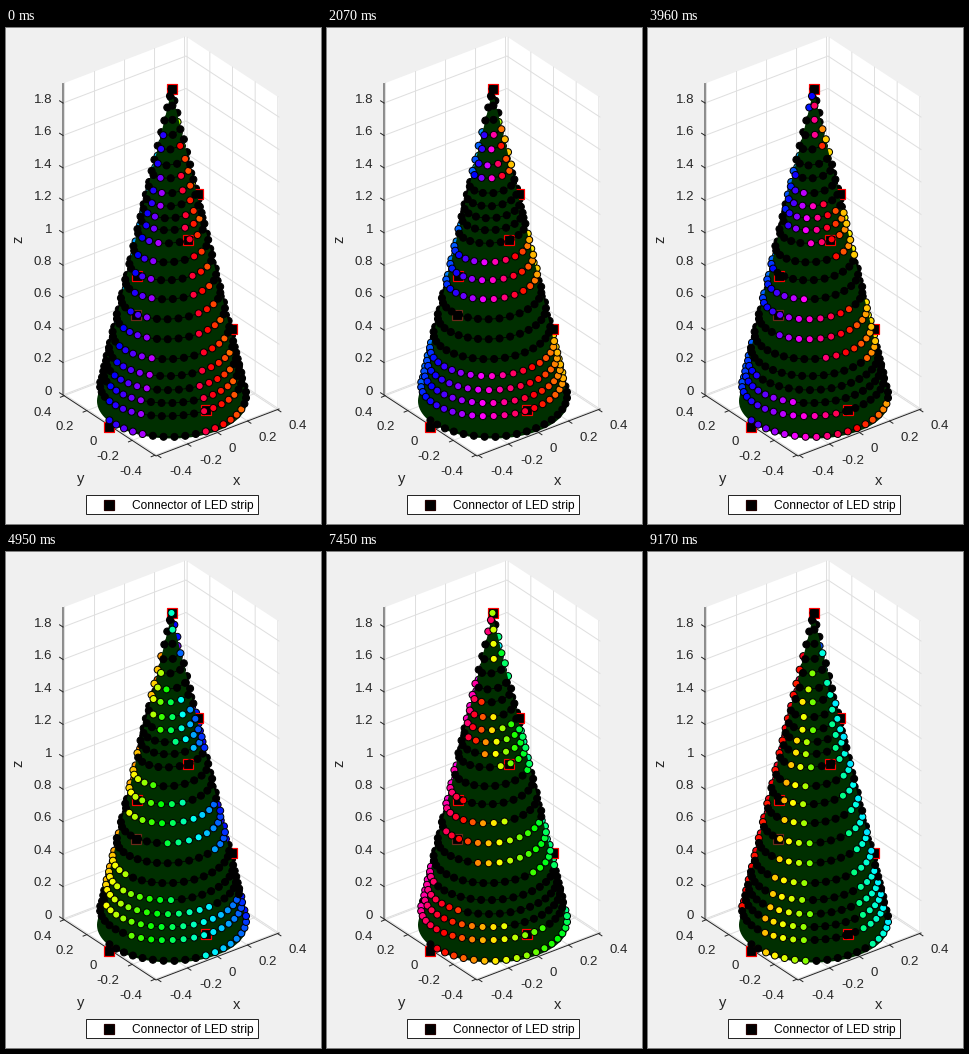
Animation of 315 by 496 pixels, one loop 9.25 s. Source, as a matplotlib script:

```python
import matplotlib.pyplot as plt
import numpy as np
from matplotlib.animation import FuncAnimation
from matplotlib.colors import hsv_to_rgb

W, H, DPI = 315, 496, 100
PX = 72 / DPI  # points per pixel
INK = "#262626"
LIM, TOP = 0.41, 1.92
LOOP, TICK = 9250, 50

plt.rcParams["font.family"] = "Liberation Sans"
fig = plt.figure(figsize=(W / DPI, H / DPI), dpi=DPI, facecolor="#f0f0f0")
ax = fig.add_axes([0, 0, 1, 1])
ax.set(xlim=(0, W), ylim=(H, 0))
ax.axis("off")


def project(x, y, z):
    """Screen position of a data point (azimuth -37.5, elevation 30)."""
    return 165 + 150 * x - 113.4 * y, 374 - 57.3 * x - 74.4 * y - 162.2 * z


def path(points, color, width=1, z=0.5):
    xs, ys = zip(*[project(*p) for p in points])
    ax.plot(xs, ys, color=color, lw=width * PX, zorder=z)


def wall(points):
    ax.fill(*zip(*[project(*p) for p in points]), color="white", lw=0, zorder=0)


def label(x, y, text, size=13.3, ha="center", color=INK, z=6):
    ax.text(x, y + 0.36 * size, text, size=size * PX, ha=ha,
            va="baseline", color=color, zorder=z)


def tick(x, y, dx, dy):
    ax.plot([x, x + dx], [y, y + dy], color=INK, lw=PX, zorder=0.7)


def draw_box():
    a, b, t = -LIM, LIM, TOP
    wall([(a, a, 0), (b, a, 0), (b, b, 0), (a, b, 0)])
    wall([(a, b, 0), (b, b, 0), (b, b, t), (a, b, t)])
    wall([(b, a, 0), (b, b, 0), (b, b, t), (b, a, t)])
    grid = "#dfdfdf"
    for v in np.linspace(-0.4, 0.4, 5):
        path([(v, a, 0), (v, b, 0), (v, b, t)], grid)
        path([(a, v, 0), (b, v, 0), (b, v, t)], grid)
        name = f"{v:.1f}" if abs(v) > 0.01 else "0"
        x, y = project(v, a, 0)
        tick(x, y, 3.4, 2.2)
        label(x + 11.5, y + 15, name, ha="left")
        x, y = project(a, v, 0)
        tick(x, y, -3.7, 1.5)
        label(x - 12.5, y + 15, name, ha="right")
    for v in np.arange(10) * 0.2:
        path([(a, b, v), (b, b, v), (b, a, v)], grid)
        x, y = project(a, b, v)
        tick(x, y, -3.4, -2.2)
        label(x - 11, y - 5, f"{v:.1f}".replace(".0", ""), ha="right")
    path([(a, b, t), (a, b, 0), (a, a, 0), (b, a, 0)], INK, z=0.7)
    label(231, 452, "x", 14.7)
    label(75, 450, "y", 14.7)
    ax.text(12, 211, "z", size=14.7 * PX, rotation=90, ha="center",
            va="center", color=INK)


def square(x, y, edge="red", z=3):
    ax.plot(x, y, "s", ms=10 * PX, mfc="black", mec=edge, mew=1.2 * PX, zorder=z)


def draw_legend():
    ax.add_patch(plt.Rectangle((79.5, 466.5), 172, 19, fc="white", ec=INK,
                               lw=PX, zorder=5))
    square(102.5, 476.5, "#200000", 6)
    label(126, 476.5, "Connector of LED strip", 12, "left", "black")


# Tree: a cone with an LED strip wound around it
CX, BASE, RADIUS, TIP = 166, 374, 76, 1.93
ROWS = [409, 388, 375, 362, 348, 331, 311, 291, 271, 252, 234, 215, 202,
        190, 178, 165, 150, 137, 121, 107, 92, 78, 66]


def wind_strip():
    heights = (412 - np.array(ROWS)) / 182
    phi, out = -0.98, []
    while phi < 2 * np.pi * (len(ROWS) - 1):
        z = np.interp(phi / (2 * np.pi), np.arange(len(ROWS)), heights)
        r = RADIUS * (1 - z / TIP)
        out.append((phi, z, r))
        phi += min(10.9 / r, 1.6)
    out.append((phi, TIP, 0))
    return np.array(out).T


def draw_cone():
    a = np.radians(np.linspace(97, -97, 60))
    r = RADIUS - 1
    xs = np.r_[CX - 0.5, CX + r * np.sin(a)]
    ys = np.r_[63, BASE - 1 + r / 2 * np.cos(a)]
    ax.fill(xs, ys, color="#002f00", lw=0, zorder=2)


phi, height, radius = wind_strip()
theta = (phi + np.pi) % (2 * np.pi) - np.pi
led_x = CX - 0.5 * height / TIP + radius * np.sin(theta)
led_y = BASE - 162.2 * height + radius / 2 * np.cos(theta)
front = (np.cos(theta) > -0.12) | (radius == 0)

draw_box()
draw_legend()
draw_cone()
for spot in [(226, 301), (192, 166)]:
    square(*spot, z=1.5)
for spot in [(165.5, 61), (182, 212), (131, 248), (200, 382), (103, 399)]:
    square(*spot)
square(130, 287, "#6b2a1a")


def draw_leds(mask, z):
    ax.plot(np.where(mask, led_x, np.nan), led_y, color="black",
            lw=0.8 * PX, zorder=z)
    return ax.scatter(led_x[mask], led_y[mask], s=(7 * PX) ** 2, c="black",
                      edgecolors="black", linewidths=PX, zorder=z + 0.1)


layers = [(draw_leds(~front, 1), ~front), (draw_leds(front, 4), front)]


def lit(t):
    """Which LEDs glow: turning stripes, then rising bands, then stripes."""
    if t < 1.5 or t > 8.4:
        phase = (np.degrees(theta) - 47.5 - 150.6 * t) / 90
    else:
        twist = np.clip((t - 2.2) / 1.5, 0, 1)
        pitch = 0.65 - 0.07 * twist
        rise = 0.615 + 0.185 * (t - 3.96)
        phase = (height - rise) / pitch + twist * theta / (2 * np.pi)
    return np.abs((phase + 0.5) % 1 - 0.5) < 0.25


def colors(t):
    hue = 0.86 - 0.505 * t + theta / (2 * np.pi) + 0.025 * np.sin(2 * theta)
    ones = np.ones_like(hue)
    return hsv_to_rgb(np.stack([hue % 1, ones, lit(t) * ones], axis=1))


# Moments at which the LEDs are refreshed: first, last, count
BURSTS = [(0, 0, 1), (70, 1060, 10), (1140, 2070, 10), (2240, 3150, 10),
          (3310, 4330, 11), (4490, 5500, 11), (5660, 6600, 10),
          (6760, 7750, 11), (7910, 8850, 10), (9010, 9170, 3)]
MOMENTS = np.concatenate([np.linspace(*b) for b in BURSTS])


def update(i):
    now = MOMENTS[np.searchsorted(MOMENTS, i * TICK + 1, side="right") - 1]
    rgb = colors(now / 1000)
    for dots, mask in layers:
        dots.set_facecolor(rgb[mask])
    return [dots for dots, _ in layers]


anim = FuncAnimation(fig, update, frames=LOOP // TICK, interval=TICK,
                     repeat=True, repeat_delay=0)
plt.show()
```
